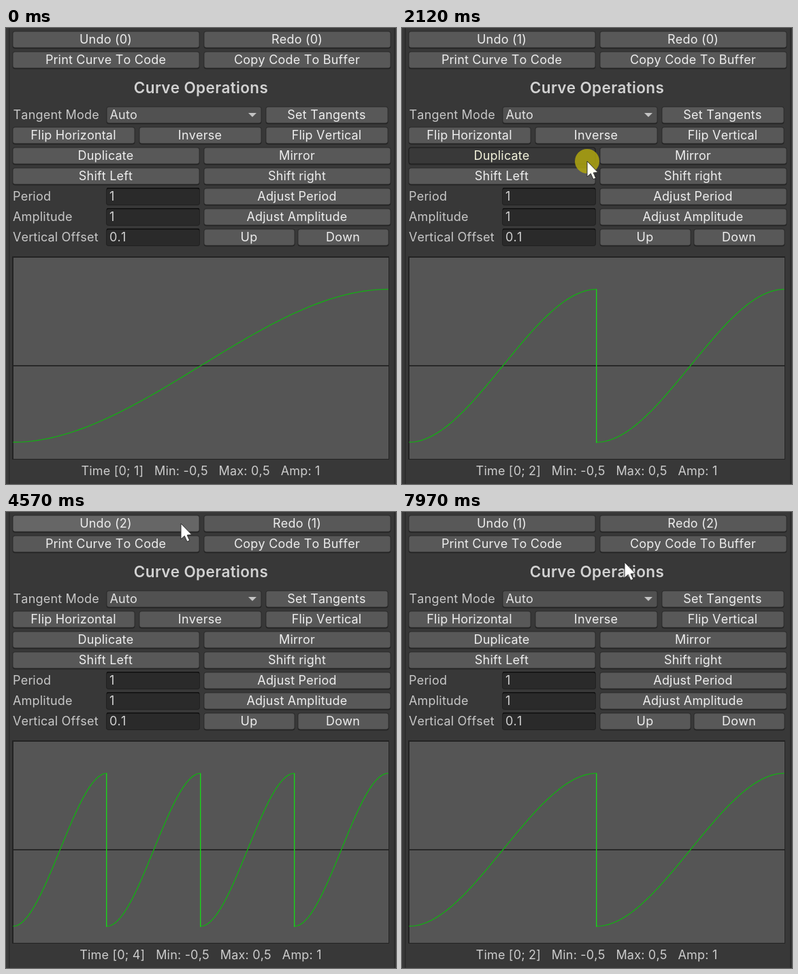
Animation of 573 by 671 pixels, one loop 8000 ms. Source, as an HTML page with a canvas:

```html
<!DOCTYPE html>
<html lang="en">
<head>
<meta charset="utf-8">
<title>Curve Operations</title>
<style>
  html, body { margin: 0; width: 100%; height: 100%; overflow: hidden; background: #383838; }
  canvas { display: block; }
</style>
</head>
<body>
<canvas id="stage" width="573" height="671"></canvas>
<script>
const ctx = document.getElementById('stage').getContext('2d');
const LOOP = 8000;
const FONT = 'Inter, "Open Sans", sans-serif';

// Rows are given by their vertical centre; buttons are 24 px high.
const BUTTONS = [
  { id: 'undo', x: 10, r: 284, y: 17 },
  { id: 'redo', x: 291, r: 565, y: 17 },
  { label: 'Print Curve To Code', x: 10, r: 284, y: 47 },
  { label: 'Copy Code To Buffer', x: 291, r: 565, y: 47 },
  { label: 'Set Tangents', x: 382, r: 561, y: 128 },
  { label: 'Flip Horizontal', x: 10, r: 189, y: 158 },
  { label: 'Inverse', x: 196, r: 375, y: 158 },
  { label: 'Flip Vertical', x: 382, r: 561, y: 158 },
  { label: 'Duplicate', x: 10, r: 284, y: 188 },
  { label: 'Mirror', x: 291, r: 565, y: 188 },
  { label: 'Shift Left', x: 10, r: 284, y: 218 },
  { label: 'Shift right', x: 291, r: 565, y: 218 },
  { label: 'Adjust Period', x: 291, r: 565, y: 248 },
  { label: 'Adjust Amplitude', x: 291, r: 565, y: 278 },
  { label: 'Up', x: 291, r: 424, y: 308 },
  { label: 'Down', x: 429, r: 562, y: 308 }
];

const FIELDS = [
  { label: 'Period', value: '1', y: 248 },
  { label: 'Amplitude', value: '1', y: 278 },
  { label: 'Vertical Offset', value: '0.1', y: 308 }
];

// Each click takes effect on release.
const CLICKS = [
  { down: 1590, up: 1660, undo: 1, redo: 0 },
  { down: 2120, up: 2250, undo: 2, redo: 0 },
  { down: 2710, up: 2840, undo: 3, redo: 0 },
  { down: 4370, up: 4570, undo: 2, redo: 1 },
  { down: 4960, up: 5090, undo: 1, redo: 2 },
  { down: 5760, up: 5830, undo: 0, redo: 3 },
  { down: 6780, up: 6850, undo: 1, redo: 2 }
];

// Pointer moves: path points are [progress, x, y].
const MOVES = [
  { start: 590, end: 1260, steps: 11,
    path: [[0, 620, 206], [0.09, 556, 206], [0.35, 380, 206], [0.636, 289, 206], [0.82, 276, 199], [1, 272, 196]] },
  { start: 3410, end: 4170, steps: 12,
    path: [[0, 272, 196], [0.2, 258, 158], [0.417, 246, 112], [0.7, 251, 50], [1, 257, 17]] },
  { start: 6230, end: 6510, steps: 5,
    path: [[0, 257, 17], [0.5, 287, 16], [1, 307, 14]] },
  { start: 7910, end: 7970, steps: 2,
    path: [[0, 307, 14], [0.5, 314, 36], [1, 327, 74]] }
];

const ARROW = [[0, 0], [0, 23], [5.3, 18.2], [9, 26.5], [12.8, 25], [9.2, 17], [16, 16.6]];

function along(path, u) {
  let i = 1;
  while (i < path.length - 1 && u > path[i][0]) i++;
  const [u0, x0, y0] = path[i - 1], [u1, x1, y1] = path[i];
  const k = (u - u0) / (u1 - u0);
  return { x: x0 + (x1 - x0) * k, y: y0 + (y1 - y0) * k };
}

function pointerAt(t) {
  const move = MOVES.filter(m => t >= m.start).pop();
  if (!move) return null;
  const frac = (t - move.start) / (move.end - move.start);
  const step = Math.floor(frac * (move.steps - 1) + 0.1);
  return along(move.path, Math.min(1, (step + 1) / move.steps));
}

function stateAt(t) {
  const last = CLICKS.filter(c => t >= c.up).pop() || { undo: 0, redo: 0 };
  return {
    undo: last.undo,
    redo: last.redo,
    pressed: CLICKS.some(c => t >= c.down && t < c.up),
    pointer: pointerAt(t)
  };
}

function text(str, x, y, { color = '#c8c8c8', align = 'left', font = '18px ' + FONT, spacing = 0.2 } = {}) {
  ctx.font = font;
  ctx.fontKerning = 'none';
  ctx.letterSpacing = spacing + 'px';
  ctx.textAlign = align;
  ctx.fillStyle = color;
  ctx.fillText(str, x, y);
}

function box(x, y, w, h, radius, color) {
  ctx.fillStyle = color;
  ctx.beginPath();
  ctx.roundRect(x, y, w, h, radius);
  ctx.fill();
}

function panel(x, r, y, fill, edge, base) {
  box(x - 0.5, y - 12.5, r - x + 1, 26, 4, base);
  box(x - 0.5, y - 12.5, r - x + 1, 24.5, 4, edge);
  box(x + 0.5, y - 11.5, r - x - 1, 23, 3, fill);
}

function hit(b, p) {
  return p && p.x >= b.x - 3 && p.x <= b.r + 3 && p.y >= b.y - 12 && p.y <= b.y + 12;
}

function drawButton(b, state) {
  const over = hit(b, state.pointer);
  const down = over && state.pressed;
  const label = b.id === 'undo' ? `Undo (${state.undo})`
    : b.id === 'redo' ? `Redo (${state.redo})` : b.label;
  if (down) panel(b.x, b.r, b.y, '#393939', '#1c1c1c', '#242424');
  else panel(b.x, b.r, b.y, over ? '#666666' : '#585858', '#303030', '#242424');
  text(label, (b.x + b.r) / 2 - 0.5, b.y + 6, { color: down ? '#f3f3dc' : '#eeeeee', align: 'center' });
}

function drawForm(state) {
  text('Curve Operations', 286.5, 96,
    { color: '#d2d2d2', align: 'center', font: '600 22.5px ' + FONT, spacing: 0.36 });

  text('Tangent Mode', 10.5, 134);
  const popup = { x: 148, r: 375, y: 128 };
  panel(popup.x, popup.r, popup.y, hit(popup, state.pointer) ? '#585858' : '#515151', '#303030', '#242424');
  text('Auto', 152.5, 134, { color: '#e4e4e4' });
  ctx.fillStyle = '#c4c4c4';
  ctx.beginPath();
  ctx.moveTo(356, 125);
  ctx.lineTo(368, 125);
  ctx.lineTo(362, 131);
  ctx.fill();

  for (const f of FIELDS) {
    text(f.label, 10, f.y + 6);
    box(147, f.y - 13, 138, 26, 4, '#212121');
    box(148, f.y - 13, 136, 3, 2, '#0f0f0f');
    box(148, f.y - 11.5, 136, 23.5, 3, '#2a2a2a');
    text(f.value, 152, f.y + 6, { color: '#d2d2d2' });
  }
  BUTTONS.forEach(b => drawButton(b, state));
}

function drawGraph(cycles) {
  const left = 10.5, width = 551, low = 609.5, rise = 225;
  ctx.fillStyle = '#232323';
  ctx.fillRect(9, 336, 554, 299);
  ctx.fillStyle = '#555555';
  ctx.fillRect(11, 338, 551, 296);
  ctx.fillStyle = '#282828';
  ctx.fillRect(11, 496, 551, 2);

  const span = width / cycles;
  ctx.lineWidth = 1.4;
  ctx.strokeStyle = '#15ab15';
  for (let c = 0; c < cycles; c++) {
    ctx.beginPath();
    for (let i = 0; i <= 80; i++) {
      const u = i / 80;
      ctx.lineTo(left + (c + u) * span, low - rise * u * u * (3 - 2 * u));
    }
    ctx.stroke();
  }
  ctx.fillStyle = '#19d419';
  for (let c = 1; c < cycles; c++) {
    ctx.fillRect(Math.floor(left + c * span - 0.5), low - rise, 1.4, rise + 1);
  }

  text(`Time [0; ${cycles}]   Min: -0,5   Max: 0,5   Amp: 1`, 286, 658, { align: 'center', color: '#cccccc' });
}

function drawPointer({ pointer, pressed }) {
  if (!pointer) return;
  const { x, y } = pointer;
  if (pressed) {
    ctx.fillStyle = 'rgba(176,166,16,0.85)';
    ctx.beginPath();
    ctx.arc(x, y, 18, 0, Math.PI * 2);
    ctx.fill();
  }
  ctx.beginPath();
  ARROW.forEach(([dx, dy]) => ctx.lineTo(x + dx, y + dy));
  ctx.closePath();
  ctx.fillStyle = pressed ? '#fffff0' : '#ffffff';
  ctx.fill();
  ctx.lineWidth = 1;
  ctx.strokeStyle = '#2c2c2c';
  ctx.stroke();
}

function draw(now) {
  const state = stateAt(now % LOOP);
  ctx.fillStyle = '#383838';
  ctx.fillRect(0, 0, 573, 671);
  ctx.fillStyle = '#2a2a2a';
  ctx.fillRect(4, 0, 1.5, 671);
  ctx.fillRect(570, 0, 1.5, 671);
  drawForm(state);
  drawGraph(2 ** state.undo);
  drawPointer(state);
}

const began = performance.now();
function tick() {
  draw(performance.now() - began);
  requestAnimationFrame(tick);
}
tick();
</script>
</body>
</html>
```
